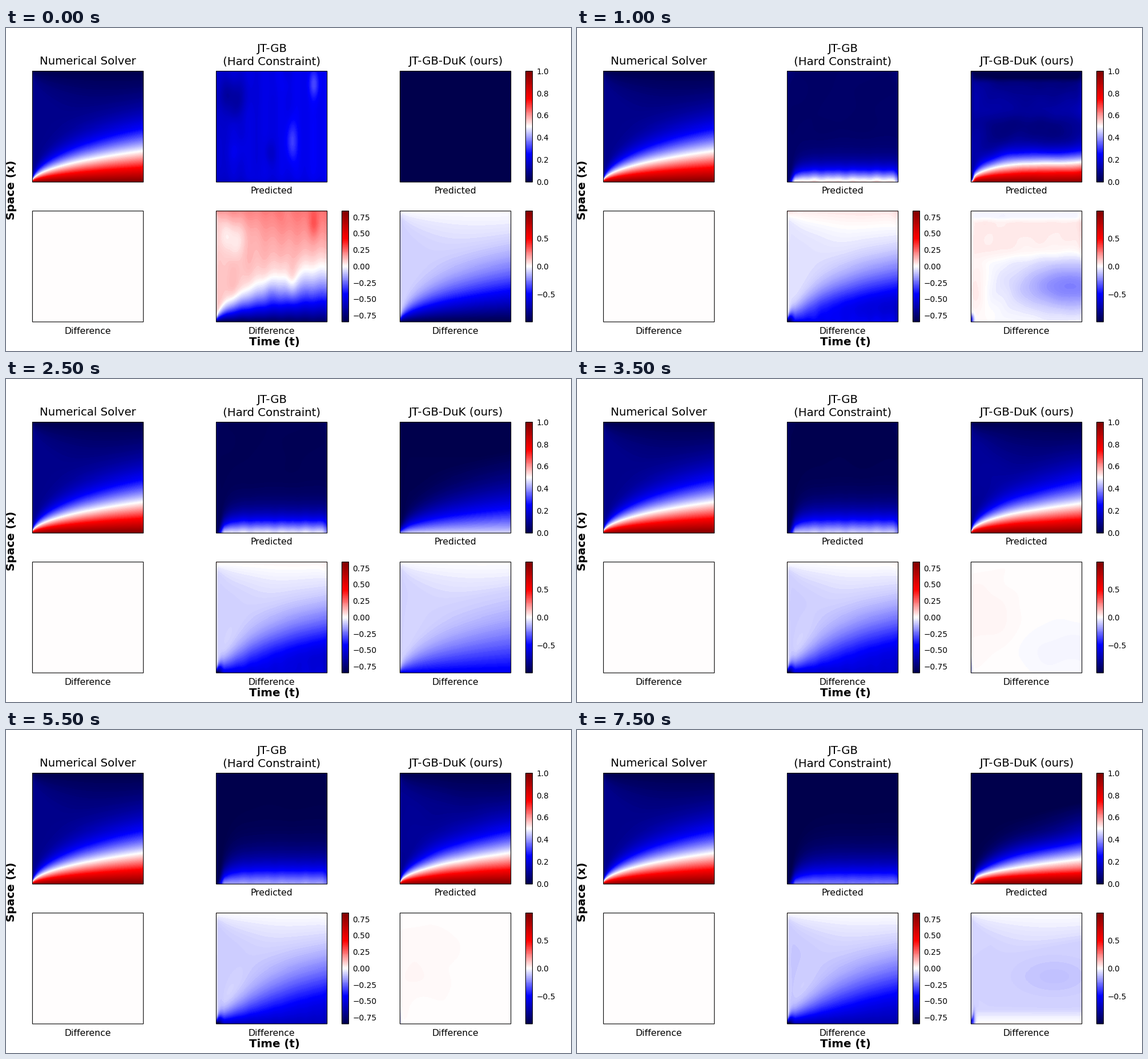
Recreate the animation shown at these times as a matplotlib script. Size 990 px wide and 566 px high, loop 8 s.

```python
import numpy as np
import matplotlib.pyplot as plt
from matplotlib.animation import FuncAnimation
from matplotlib.patches import Rectangle

W, H, DPI = 990, 566, 100
N, SIDE = 194, 194.3         # grid cells and panel size in pixels
STEPS = 16
MID, RIGHT = 0.844, 0.997    # colour limits of the difference panels
U0 = 0.09                    # initial concentration
LEFT_X, MID_X, RIGHT_X = (46.4 + 322 * k for k in range(3))
TOP_Y, LOW_Y = 75.7, 320.7

T, X = np.meshgrid((np.arange(N) + 0.5) / N, (np.arange(N)[::-1] + 0.5) / N)


def solve():
    """Diffusion-sorption equation by explicit steps, one column per time."""
    sub = 44
    dt = 500 / (N * sub)
    u = np.full(N + 2, U0)
    out = np.empty((N, N))
    for col in range(N):
        for _ in range(sub):
            u[0], u[-1] = 2 - u[1], -u[-2]
            c = np.maximum(u[1:-1], 1e-6)
            d = 5e-4 / (1 + 2.157 * c ** -0.126)
            u[1:-1] += dt * N * N * d * (u[2:] - 2 * u[1:-1] + u[:-2])
        out[:, col] = u[-2:0:-1]
    return out


def bump(t, x, st, sx):
    return np.exp(-((T - t) / st) ** 2 - ((X - x) / sx) ** 2)


def smooth(v, lo, hi):
    s = np.clip((v - lo) / (hi - lo), 0, 1)
    return s * s * (3 - 2 * s)


def mix(a, b, s):
    return a + (b - a) * s


def wobble(seed, freq):
    rng = np.random.default_rng(seed)
    total = np.zeros_like(T)
    for _ in range(7):
        a, b = rng.uniform(-freq, freq, 2)
        total += np.sin(2 * np.pi * (a * T + b * X) + rng.uniform(0, 6.28))
    return total / 3


def first_guess():
    """Untrained network: flat blue with tall soft blotches."""
    rng = np.random.default_rng(7)
    u = 0.19 + 0.05 * T + 0.008 * np.sin(2 * np.pi * 7 * T + 1)
    for _ in range(16):
        t, x = rng.uniform(0, 1, 2)
        u += rng.uniform(-0.03, 0.025) * bump(t, x, 0.05, 0.1)
    u += 0.09 * bump(.68, .37, .05, .18) + 0.08 * bump(.88, .88, .045, .12)
    u -= 0.08 * bump(.14, .78, .13, .15) + 0.03 * np.exp(-T / 0.03)
    return u - 0.03 * np.exp(-X / 0.04)


TRUE = solve()
GUESS = first_guess()
RIPPLE = wobble(4, 3)


def single_model(step):
    amp = 0.51 - 0.0095 * step
    reach = 0.125 + 0.08 * smooth(step, 1, 11)
    back = 0.04 * np.exp(-max(step - 2, 0) / 3)
    rough = np.exp(-step / 10)
    grow = 1.02 - np.exp(-np.maximum(T - 0.01, 0) / (0.05 + 0.003 * step))
    edge = smooth(T, 0, 0.08) * (1 - 0.3 * rough * smooth(T, .95, 1))
    waves = 1 + 0.02 * rough * (np.sin(2 * np.pi * 9 * T) + np.sin(2 * np.pi * 5.3 * T))
    u = back + amp * edge * waves * np.exp(-(X / (reach * grow)) ** 1.35)
    u += 0.003 * rough * RIPPLE * smooth(X, .1, .5)
    u += 0.03 * rough * (bump(1, 1, .05, .1) + bump(0, 1, .06, .08))
    u += (U0 - back) * np.exp(-T / 0.008) * smooth(X, 0, .05)
    return np.maximum(mix(u, GUESS, max(0, 1 - step / 2)), 0)


def rough_fit():
    d = -0.25 * bump(.9, .32, .48, .22)
    d += 0.04 * smooth(X, .5, .66) * (1 - smooth(X, .88, .94)) * smooth(T, 0, .04)
    d += 0.05 * bump(.05, .3, .1, .25)
    d -= 0.02 * smooth(X, .91, .95) * smooth(T, 0, .05)
    d += 0.04 * bump(1, .9, .03, .3) - 0.5 * bump(0, .02, .025, .05)
    return TRUE + d + 0.004 * wobble(9, 5)


def good_fit(bias, seed, corner):
    return TRUE + bias + 0.003 * wobble(seed, 3) - corner * bump(0, .04, .015, .08)


def late_fit(depth):
    d = -np.minimum(TRUE, 0.085) * smooth(X, 0, 0.16)
    d -= depth * bump(.75, .43, .35, .17) + 0.45 * bump(.01, .03, .025, .09)
    return np.maximum(TRUE + d + 0.03 * np.exp(-X / 0.008), 0)


FAILED = 0.006 + 0.06 * np.exp(-X / 0.22) * smooth(T, 0, .1)
FRONT = np.clip((TRUE - U0) / (1 - U0), 0, 1)
PLATEAU = smooth(X, 0, .25) * smooth(1 - X, 0, .35) * (1 - 0.45 * smooth(T, .3, 1))

# What the expert model looks like at the steps where its training turns.
TURNS = {
    0: np.zeros_like(T),
    2: rough_fit(),
    4: FAILED,
    6: mix(FAILED, FRONT, 0.85),
    7: good_fit(0.024 * bump(.12, .5, .32, .36) - 0.02 * bump(.85, .2, .45, .22), 12, .15),
    11: good_fit(0.014 * bump(.15, .52, .36, .36), 15, .1),
    13: good_fit(0.05 * PLATEAU, 18, .05),
    14: late_fit(0.07),
    15: late_fit(0.035),
}


def expert_model(step):
    a = max(k for k in TURNS if k <= step)
    b = min(k for k in TURNS if k >= step)
    return mix(TURNS[a], TURNS[b], (step - a) / max(b - a, 1))


def bands(v, lo, hi, n=199):
    """Filled-contour look: n flat bands scaled to 0..1."""
    i = np.floor((np.clip(v, lo, hi) - lo) / (hi - lo) * n)
    return (np.minimum(i, n - 1) + 0.5) / n


fig = plt.figure(figsize=(W / DPI, H / DPI), dpi=DPI, facecolor="white")
ax = fig.add_axes([0, 0, 1, 1])
ax.axis("off")


def px(size):
    return size * 72 / DPI


def picture(x, y, w, data):
    im = ax.imshow(data, cmap="seismic", vmin=0, vmax=1, aspect="auto",
                   interpolation="nearest", extent=(x, x + w, y + SIDE, y))
    ax.add_patch(Rectangle((x, y), w, SIDE, fill=False, ec="black", lw=px(1.1),
                           snap=False, zorder=3))
    return im


def label(x, y, s, size, **kw):
    kw = {"ha": "center", "va": "baseline", **kw}
    ax.text(x, y, s, fontsize=px(size), family="DejaVu Sans", **kw)


def colorbar(x, y, lo, hi, ticks, fmt):
    picture(x, y, 12, bands(np.linspace(1, 0, 398)[:, None], 0, 1))
    for v in ticks:
        ty = y + SIDE * (hi - v) / (hi - lo)
        label(x + 19, ty + 5, format(v, fmt).replace("-", "\u2212"), 13.8, ha="left")


BLANK = np.full((N, N), 0.5)
picture(LEFT_X, TOP_Y, SIDE, bands(TRUE, 0, 1))
picture(LEFT_X, LOW_Y, SIDE, BLANK)
views = [picture(x, y, SIDE, BLANK) for x in (MID_X, RIGHT_X) for y in (TOP_Y, LOW_Y)]

colorbar(910.5, TOP_Y, 0, 1, np.arange(6) / 5, ".1f")
colorbar(588.5, LOW_Y, -MID, MID, np.arange(-3, 4) / 4, ".2f")
colorbar(910.5, LOW_Y, -RIGHT, RIGHT, (-0.5, 0, 0.5), ".1f")

for x, title in ((LEFT_X, "Numerical Solver"), (MID_X, "(Hard Constraint)"),
                 (RIGHT_X, "JT-GB-DuK (ours)")):
    label(x + SIDE / 2, 64.3, title, 19.75)
    label(x + SIDE / 2, 535.6, "Difference", 15.8)
    if x != LEFT_X:
        label(x + SIDE / 2, 290.4, "Predicted", 15.8)
label(MID_X + SIDE / 2, 41.8, "JT-GB", 19.75)
label(470, 556, "Time (t)", 19.75, weight="bold")
label(14.6, 283.5, "Space (x)", 19.75, weight="bold", rotation=90,
      rotation_mode="anchor")
ax.set_xlim(0, W)
ax.set_ylim(H, 0)


def draw(step):
    models = ((single_model(step), MID), (expert_model(step), RIGHT))
    for k, (u, lim) in enumerate(models):
        views[2 * k].set_data(bands(u, 0, 1))
        views[2 * k + 1].set_data(bands(u - TRUE, -lim, lim))
    return views


anim = FuncAnimation(fig, draw, frames=STEPS, interval=500, repeat=True,
                     repeat_delay=0, blit=False)
plt.show()
```
